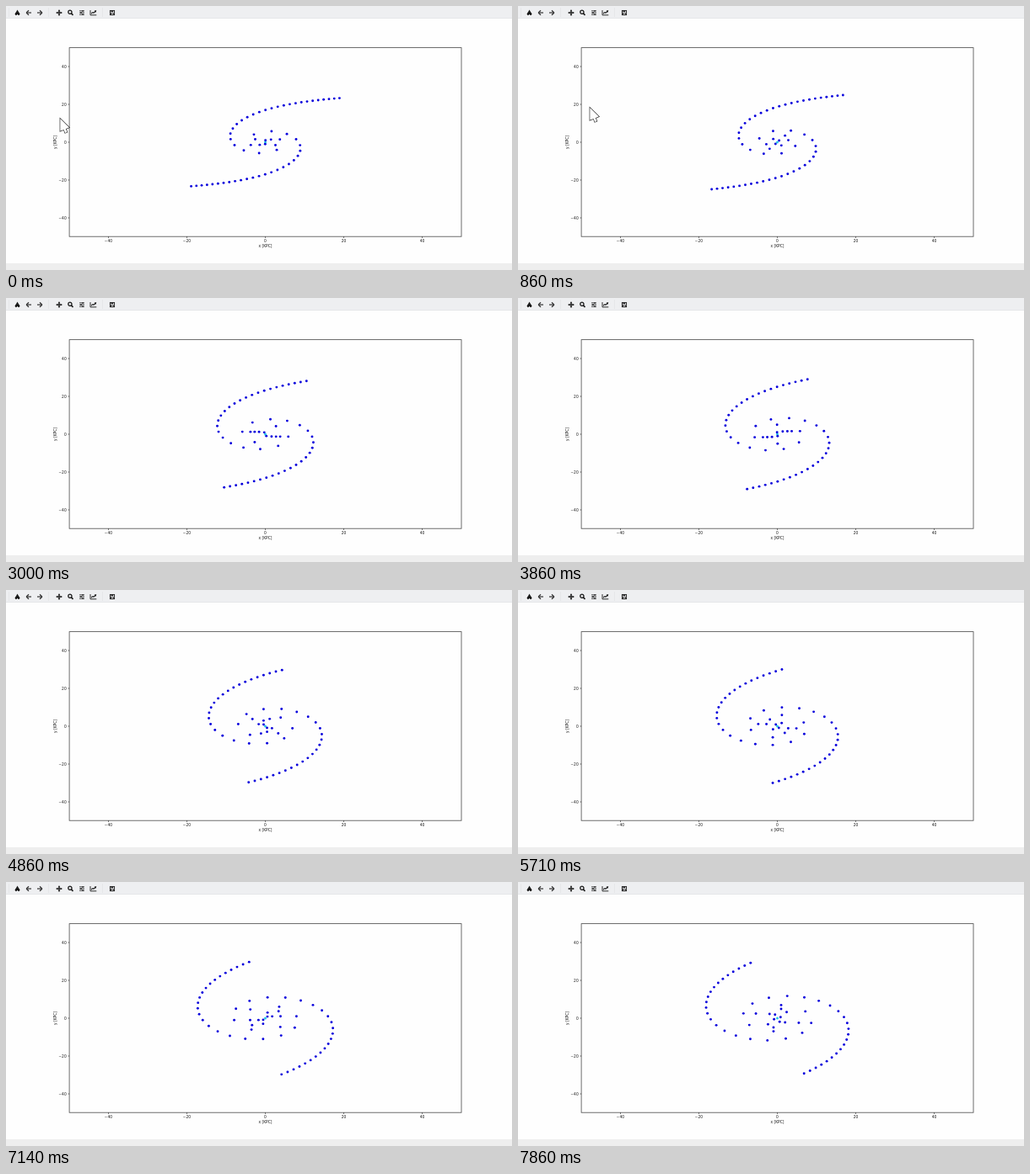
Write an HTML page with a canvas that moves like this. It is 600 by 314 pixels and loops after 8 s.

```html
<!DOCTYPE html>
<html lang="en">
<head>
<meta charset="utf-8">
<title>Rotating spiral plot</title>
<style>
  html, body { margin: 0; width: 100%; height: 100%; overflow: hidden; background: #fefefe; }
  canvas { display: block; width: 600px; height: 314px; }
</style>
</head>
<body>
<canvas id="stage" width="600" height="314"></canvas>
<script>
const ctx = document.getElementById('stage').getContext('2d');
const LOOP = 8000, FPS = 7;
const CX = 307.5, CY = 162, KX = 4.65, KY = 2.25;
const INK = '#1a1a1a', BLUE = '#0800dc', CYAN = '#25cbe8';

// Distance (kpc) every particle has travelled; the pace rises slowly.
const distanceAt = step => 26.67 + 0.4425 * step + 0.00099 * step * step;

// Steps begin on multiples of 10 ms, close to 7 per second.
const startOf = step => 10 * Math.round(step * 100 / FPS);

function stepAt(t) {
  const step = Math.floor(t * FPS / 1000);
  if (startOf(step + 1) <= t) return step + 1;
  return startOf(step) > t ? step - 1 : step;
}

function line(x1, y1, x2, y2, width = 1, color = INK) {
  ctx.beginPath();
  ctx.moveTo(x1, y1);
  ctx.lineTo(x2, y2);
  ctx.lineWidth = width;
  ctx.strokeStyle = color;
  ctx.stroke();
}

function box(x, y, w, h, color = INK) {
  ctx.fillStyle = color;
  ctx.fillRect(x, y, w, h);
}

// Regular triangle with one corner pointing along the given angle.
function triangle(x, y, r, angle) {
  ctx.beginPath();
  for (let i = 0; i < 3; i++) {
    const a = angle + i * Math.PI * 2 / 3;
    ctx.lineTo(x + r * Math.cos(a), y + r * Math.sin(a));
  }
  ctx.fillStyle = INK;
  ctx.fill();
}

function dot(x, y, r, color) {
  ctx.beginPath();
  ctx.arc(x, y, r, 0, Math.PI * 2);
  ctx.fillStyle = color;
  ctx.fill();
}

function at(x, y, draw, turn = 0) {
  ctx.save();
  ctx.translate(x, y);
  ctx.rotate(turn);
  draw();
  ctx.restore();
}

// Small type is set large and scaled evenly, to keep its shape.
function label(text, x, y, align = 'center', turn = 0) {
  at(x, y, () => {
    ctx.scale(0.1, 0.1);
    ctx.font = '44px "DejaVu Sans", sans-serif';
    ctx.textAlign = align;
    ctx.fillStyle = INK;
    ctx.fillText(text, 0, 0);
  }, turn);
}

function home() {
  triangle(0, 0.2, 3.7, -Math.PI / 2);
  box(-2.4, 0, 1.7, 3);
  box(0.7, 0, 1.7, 3);
}

function arrow() {
  line(-2.6, 0, 3, 0, 1.2, '#333');
  for (const side of [-1, 1]) line(-2.9, 0, 0, 2.8 * side, 1.2, '#333');
}

function move() {
  for (let i = 0; i < 4; i++) {
    line(0, 0, 2.4, 0, 1.3);
    triangle(2.5, 0, 1.5, 0);
    ctx.rotate(Math.PI / 2);
  }
}

function lens() {
  ctx.beginPath();
  ctx.arc(-0.6, -0.7, 2.1, 0, Math.PI * 2);
  ctx.lineWidth = 1.3;
  ctx.strokeStyle = INK;
  ctx.stroke();
  line(0.9, 0.8, 3, 2.9, 1.6);
}

function sliders() {
  for (let i = -1; i <= 1; i++) {
    const y = 2.2 * i, knob = i ? 1 : -1;
    line(-3, y, 3, y, 0.8);
    line(knob, y - 0.9, knob, y + 0.9, 1.2);
  }
}

function chart() {
  line(-3.5, -3, -3.5, 2.8, 0.9);
  line(-3.5, 2.8, 3.8, 2.8, 0.9);
  line(-2.4, 1.2, -0.6, -0.6, 1.1);
  line(-0.6, -0.6, 0.4, 0.4, 1.1);
  line(0.4, 0.4, 2.8, -2, 1.1);
  triangle(2.6, -1.8, 1.6, -Math.PI / 4);
}

function disk() {
  ctx.lineWidth = 0.9;
  ctx.strokeStyle = INK;
  ctx.strokeRect(-2.6, -2.6, 5.2, 5.2);
  box(-1.6, -2.6, 2.8, 1.7);
  ctx.lineWidth = 0.7;
  ctx.strokeRect(-1.4, 0.6, 2.8, 2);
}

function drawWindow() {
  box(0, 0, 600, 314, '#fefefe');
  box(0, 0, 600, 15, '#eeeff1');
  box(0, 14, 600, 1, '#e6e7e9');
  box(0, 306, 600, 8, '#eeeeee');
  for (const x of [3, 50, 114]) box(x, 2, 1, 11, '#e6e7e9');

  at(13.5, 8, home);
  at(27, 8, arrow);
  at(40, 8, arrow, Math.PI);
  at(63, 8, move);
  at(76.5, 8, lens);
  at(90, 8, sliders);
  at(103.5, 8, chart);
  at(126, 8, disk);
}

function drawAxes() {
  ctx.lineWidth = 0.8;
  ctx.strokeStyle = '#4a4a4a';
  ctx.strokeRect(75.1, 49.6, 464.9, 224.6);
  for (let v = -40; v <= 40; v += 20) {
    const x = CX + v * KX, y = CY - v * KY;
    const text = String(v).replace('-', '\u2212');
    line(x, 274.2, x, 276, 0.6);
    line(73.5, y, 75.1, y, 0.6);
    label(text, x, 281);
    label(text, 71.7, y + 1.7, 'right');
  }
  label('x [KPC]', CX, 286.6);
  label('y [KPC]', 59.6, CY, 'center', -Math.PI / 2);
}

// Two arms of particles at equal speed, so inner ones turn faster.
function drawStars(step) {
  const s = distanceAt(step);
  dot(CX, CY, 1.5, CYAN);
  for (let r = 1; r <= 30; r++) {
    const dx = r * Math.cos(s / r) * KX, dy = r * Math.sin(s / r) * KY;
    dot(CX + dx, CY - dy, 1.45, BLUE);
    dot(CX - dx, CY + dy, 1.45, BLUE);
  }
}

function pointerShape() {
  const path = new Path2D('M0 0V14.8L10.6 10.5Z');
  path.addPath(new Path2D('M3.4 11L5.8 17L8.2 16L5.7 10Z'));
  return path;
}
const pointer = pointerShape();

function drawPointer(step) {
  if (step > 7) return;
  const p = Math.min(step / 6, 1);
  at(64.3 + 21 * p, 134 - 13 * p, () => {
    ctx.lineWidth = 1.3;
    ctx.strokeStyle = '#222';
    ctx.stroke(pointer);
    ctx.fillStyle = '#fff';
    ctx.fill(pointer);
  });
}

function frame(now) {
  const step = stepAt(now % LOOP);
  drawWindow();
  drawAxes();
  drawStars(step);
  drawPointer(step);
  requestAnimationFrame(frame);
}

frame(0);
</script>
</body>
</html>
```
